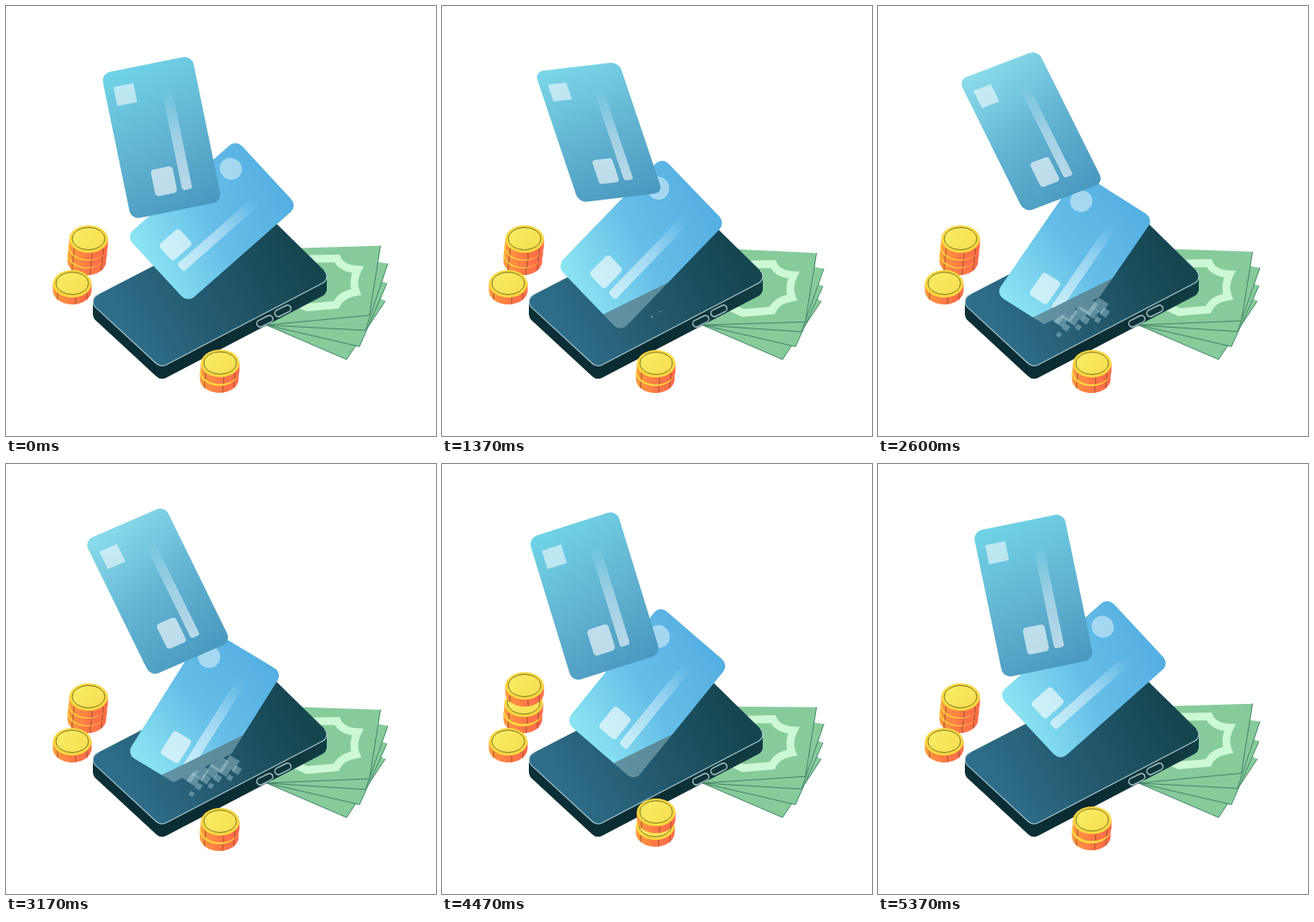
These frames come from a looping animation (500x500 px, 5410 ms). An HTML page with a canvas:

```html
<!DOCTYPE html>
<html lang="en">
<head>
<meta charset="utf-8">
<title>Cards and phone</title>
<style>
html, body { margin: 0; width: 100%; height: 100%; overflow: hidden; background: #fff; }
canvas { display: block; width: 500px; height: 500px; }
</style>
</head>
<body>
<canvas id="stage" width="500" height="500"></canvas>
<script>
const ctx = document.getElementById('stage').getContext('2d');
const LOOP = 5410;
const GREEN = '#87cb9b', GREEN_LINE = '#438568';
const GHOST = 'rgba(185,217,222,.4)';

// A looping swing: middle, cosine part, sine part, double-speed part
function swing(t, mid, cos, sin, twice = 0) {
  const a = 2 * Math.PI * t / LOOP;
  return mid + cos * Math.cos(a) + sin * Math.sin(a) + twice * Math.cos(2 * a);
}

// One smooth rise and fall per loop
function hop(t, start, length) {
  const u = ((t - start + LOOP) % LOOP) / length;
  return u < 1 ? Math.sin(Math.PI * u) ** 2 : 0;
}

// Corner positions: top left, top right, bottom left
const upperCorners = t => [
  [swing(t, 101.7, 8.9, 6.3), swing(t, 82.6, -4.1, -6.2)],
  [swing(t, 200.5, 15.6, 5.3), swing(t, 56.2, 3.6, 6.4, -2.4)],
  [swing(t, 158, -12.4, .8), swing(t, 242.8, 3.3, -11.8, 2.2)]
];
const lowerCorners = t => [
  [swing(t, 250.6, 16.9, 5.7), swing(t, 174.1, -18.8, 1)],
  [swing(t, 329.6, 9.3, .5), swing(t, 242, -6.9, 7.6, -2.6)],
  [swing(t, 138.6, 1.1, -5.2), swing(t, 305.8, -34, -8.1, -4)]
];

function linear(x0, y0, x1, y1, ...colors) {
  const g = ctx.createLinearGradient(x0, y0, x1, y1);
  colors.forEach((c, i) => g.addColorStop(i / (colors.length - 1), c));
  return g;
}

function poly(points) {
  ctx.beginPath();
  points.forEach(p => ctx.lineTo(...p));
  ctx.closePath();
}

function stroke(color, width) {
  ctx.strokeStyle = color;
  ctx.lineWidth = width;
  ctx.stroke();
}

function box(x, y, w, h, r, fill) {
  ctx.beginPath();
  ctx.roundRect(x, y, w, h, r);
  ctx.fillStyle = fill;
  ctx.fill();
}

function layer(draw) {
  ctx.save();
  draw();
  ctx.restore();
}

// Card space is 100 wide and 170 high
function toCard([[ax, ay], [bx, by], [cx, cy]]) {
  ctx.transform((bx - ax) / 100, (by - ay) / 100, (cx - ax) / 170, (cy - ay) / 170, ax, ay);
}

function cardFace(corners, slant, colors, mark) {
  layer(() => {
    toCard(corners);
    box(0, 0, 100, 170, 10, linear(50 - slant, 0, 50 + slant, 170, ...colors));
    box(60.5, 30, 11, 119, 3, linear(0, 30, 0, 149, 'rgba(255,255,255,0)', 'rgba(255,255,255,.4)', 'rgba(255,255,255,.6)'));
    box(31, 119, 24, 31, 4, 'rgba(255,255,255,.62)');
    mark();
  });
}

function upperCard(t, melt) {
  const top = `hsl(190 70% ${67 + 6 * melt}%)`;
  cardFace(upperCorners(t), 25, [top, '#63b4d3', '#4b99c0'],
    () => box(10, 18, 22, 22, 0, 'rgba(255,255,255,.55)'));
}

// Keeps what lies between two offsets of the slanted fade line
function clipBand(from, to) {
  const y = x => 360 - .49 * (x - 184.7);
  poly([[0, y(0) + from], [500, y(500) + from], [500, y(500) + to], [0, y(0) + to]]);
  ctx.clip();
}

// Squares spread along the melting edge, smaller further out
function bits(melt) {
  const count = 14;
  for (let i = 0; i < count; i++) {
    const along = i * .618 % 1, out = i / count;
    const x = 70 + 38 * along + 16 * out, y = 152 - 46 * along + 22 * out;
    const size = (5 + 13 * (1 - out) ** 1.5) * melt;
    box(x - size / 2, y - size / 2, size, size, 0, GHOST);
  }
}

function lowerCard(t, melt) {
  const corners = lowerCorners(t);
  const edge = -9 * hop(t, 4150, 1260), depth = 38 - 24 * melt;
  layer(() => {
    clipBand(-600, edge);
    cardFace(corners, -30, ['#55afe2', '#66bee8', '#8be4f2'],
      () => box(8, 15, 25, 25, 12.5, 'rgba(255,255,255,.45)'));
  });
  layer(() => {
    clipBand(edge, edge + depth);
    toCard(corners);
    box(0, 0, 100, 170, 10, GHOST);
  });
  layer(() => {
    clipBand(edge + depth, 600);
    toCard(corners);
    bits(melt);
  });
}

function note(right, low) {
  const hub = [303, 371];
  poly([hub, [325, 282], right, low]);
  ctx.fillStyle = GREEN;
  ctx.fill();
  ctx.beginPath();
  [hub, low, right].forEach(p => ctx.lineTo(...p));
  stroke(GREEN_LINE, 1);
}

function notes(t) {
  const drop = swing(t, 6.2, -3.5, 1, -2);
  note([441, 343], [396, 411]);
  note([443, 322 + drop * .4], [411, 396]);
  note([444, 299 + drop * .7], [418, 377 + drop * .2]);
  note([435.5, 278 + drop], [422.5, 359 + drop * .9]);
  layer(() => {
    ctx.translate(0, drop * .75);
    ctx.beginPath();
    ctx.moveTo(330, 294);
    ctx.lineTo(385, 293);
    ctx.quadraticCurveTo(390, 305, 409, 306);
    ctx.quadraticCurveTo(402, 320, 407, 332);
    ctx.quadraticCurveTo(389, 335, 384, 347);
    ctx.lineTo(350, 350);
    ctx.lineTo(328, 340);
    stroke('#cdf8d4', 9);
  });
}

const [LEFT, TOP, RIGHT, BOTTOM] = [[95, 342], [298, 237], [379, 316.5], [180, 420.5]];

function phoneEdge() {
  ctx.beginPath();
  ctx.moveTo(108, 335);
  ctx.arcTo(...LEFT, ...BOTTOM, 9);
  ctx.arcTo(...BOTTOM, ...RIGHT, 10);
  ctx.arcTo(...RIGHT, ...TOP, 9);
}

function phoneFace() {
  phoneEdge();
  ctx.arcTo(...TOP, ...LEFT, 10);
  ctx.closePath();
  ctx.fill();
}

function pill(x, y) {
  layer(() => {
    ctx.translate(x, y);
    ctx.rotate(-.46);
    ctx.beginPath();
    ctx.roundRect(-10, -4, 20, 8, 4);
    stroke('#9dbcc0', 1.5);
  });
}

function phone() {
  ctx.fillStyle = linear(100, 380, 374, 330, '#0b3038', '#0a2a31', '#123d44');
  for (let y = 15; y > 0; y--) layer(() => {
    ctx.translate(0, y);
    phoneFace();
  });
  ctx.fillStyle = linear(135, 385, 335, 275, '#2f6e8b', '#23586d', '#15454f');
  phoneFace();
  phoneEdge();
  stroke('#a9c8cd', 1.1);
  pill(301, 366.5);
  pill(322, 354.5);
}

function coin(x, y) {
  const rx = 22.5, ry = 16, thick = 8;
  layer(() => {
    ctx.translate(x, y);
    ctx.beginPath();
    ctx.ellipse(0, thick, rx, ry, 0, 0, Math.PI);
    ctx.lineTo(-rx, 0);
    ctx.lineTo(rx, 0);
    ctx.fillStyle = linear(-rx, 0, rx, 0, '#ff9b3d', '#ff7a45', '#ff6a4a');
    ctx.fill();
    for (const dx of [-17, 4, 17]) {
      const edge = ry * Math.sqrt(1 - (dx / rx) ** 2);
      ctx.beginPath();
      ctx.moveTo(dx, edge);
      ctx.lineTo(dx, edge + thick);
      stroke('#9a5130', 1);
    }
    ctx.beginPath();
    ctx.ellipse(0, 0, rx, ry, 0, 0, 7);
    ctx.fillStyle = '#f9d73f';
    ctx.fill();
    ctx.beginPath();
    ctx.ellipse(0, -.5, 19, 13, 0, 0, 7);
    ctx.fillStyle = linear(-12, -10, 12, 10, '#f8ea62', '#f8e052');
    ctx.fill();
    stroke('#7d7a2c', 1);
  });
}

function coins(t) {
  const back = hop(t, 4220, 1120), front = hop(t, 4260, 1190);
  coin(94, 289);
  coin(95, 280 - 4 * back);
  coin(96, 271 - 31 * back);
  coin(77, 323);
  coin(248, 426 - 18 * front);
  coin(249, 416 - 39 * front);
}

function draw(t) {
  const melt = Math.min(1, Math.max(0, swing(t - .48 * LOOP, .25, .9, 0)));
  ctx.fillStyle = '#fff';
  ctx.fillRect(0, 0, 500, 500);
  notes(t);
  phone();
  lowerCard(t, melt);
  upperCard(t, melt);
  coins(t);
}

const start = performance.now();
function tick() {
  draw((performance.now() - start) % LOOP);
  requestAnimationFrame(tick);
}
tick();
</script>
</body>
</html>
```
